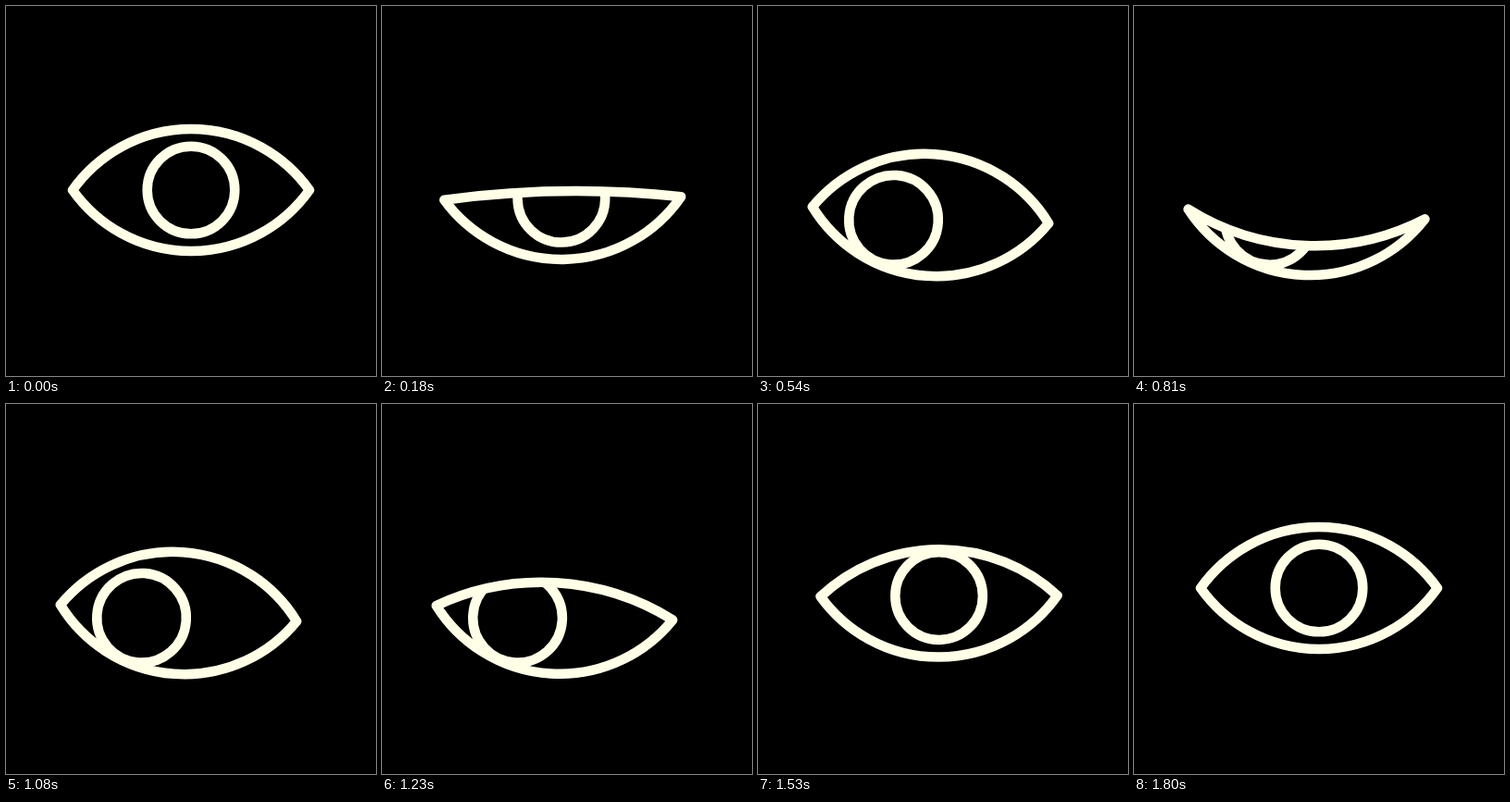
An HTML page for the animation above (3.86 s loop, 400 by 400 pixels).

```html
<!DOCTYPE html>
<html lang="en">
<head>
<meta charset="utf-8">
<title>Blinking eye</title>
<style>
  html, body { margin: 0; height: 100%; overflow: hidden; background: #000; }
  svg { display: block; width: 100vw; height: 100vh; }
</style>
</head>
<body>
<svg viewBox="0 0 400 400" fill="none" stroke="#ffffe8" stroke-width="10.5" stroke-linejoin="round">
  <clipPath id="opening"><path id="mask"/></clipPath>
  <g id="eye">
    <g clip-path="url(#opening)"><circle id="iris"/></g>
    <path id="lids"/>
  </g>
</svg>
<script>
const LOOP = 3860;
const BLINK = 540;
const BLINK_COUNT = 3;
const HALF_WIDTH = 128;
const LID_HEIGHT = 66;
const [eye, mask, iris, lids] = ['eye', 'mask', 'iris', 'lids'].map(id => document.getElementById(id));

const progress = (start, end, time) => Math.min(1, Math.max(0, (time - start) / (end - start)));

// 0 before start, 1 after end, eased between.
function ease(start, end, time) {
  const s = progress(start, end, time);
  return s * s * (3 - 2 * s);
}

// Rises from 0 to 1 and falls back between start and end.
const hump = (start, end, time) => Math.sin(Math.PI * progress(start, end, time)) ** 2;

function blinkAt(time) {
  if (time >= BLINK * BLINK_COUNT) return 0;
  const phase = time % BLINK;
  return ease(80, 260, phase) - ease(300, 500, phase);
}

// Circular arc from the opposite corner to x = end, bulging to y = height.
function lidArc(end, height) {
  const radius = (HALF_WIDTH ** 2 + height ** 2) / (2 * Math.abs(height) + 0.01);
  const sweep = end * height < 0 ? 1 : 0;
  return `A${radius} ${radius} 0 0 ${sweep} ${end} 0`;
}

function draw(time) {
  const blink = blinkAt(time);
  const look = ease(150, 420, time) - ease(1320, 1530, time);
  const shift = ease(60, 360, time) - ease(1350, 1650, time)
    - 0.25 * hump(0, 150, time) - 0.18 * hump(1490, 1800, time);

  const x = 200 - 13.5 * shift;
  const y = 199 + 27 * shift - blink;
  eye.setAttribute('transform', `translate(${x} ${y}) rotate(${4 * look - 1.6 * blink})`);

  const upper = 100 * blink - LID_HEIGHT;
  const outline = `M${-HALF_WIDTH} 0${lidArc(HALF_WIDTH, upper)}${lidArc(-HALF_WIDTH, LID_HEIGHT)}Z`;
  lids.setAttribute('d', outline);
  mask.setAttribute('d', outline);

  iris.setAttribute('cx', -39.5 * look);
  iris.setAttribute('cy', 8 * look);
  iris.setAttribute('r', 47.3 + look);
}

function tick() {
  // The picture advances in 30 ms steps.
  draw(Math.floor(performance.now() % LOOP / 30) * 30);
  requestAnimationFrame(tick);
}
tick();
</script>
</body>
</html>
```
